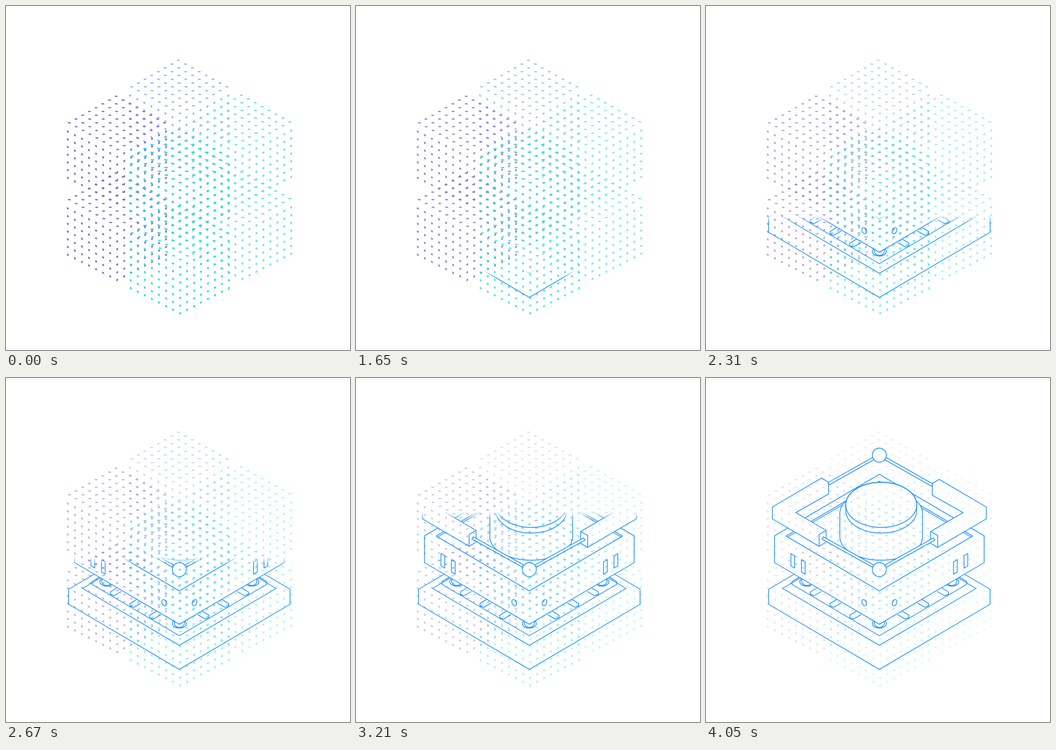
An HTML page with a canvas for the animation above (5850 ms loop, 640 px wide and 640 px high).

```html
<!DOCTYPE html>
<html lang="en">
<head>
<meta charset="utf-8">
<title>Dot cubes to line drawing</title>
<style>
html, body { margin: 0; width: 100%; height: 100%; overflow: hidden; background: #fff; }
canvas { display: block; width: 100vw; height: 100vh; }
</style>
</head>
<body>
<canvas id="stage"></canvas>
<script>
const LOOP = 5850, START = 1350, SPAN = 2700, STEP = 30;
const SIZE = 640, FADE = 14;
const AXIS = 322.5, S = 0.588; // centre line and slope of the isometric edges
const SIDES = [-1, 1];
const BLUE = '#1e90ff';
const DOTS = { back: '#8fb4f8', left: '#7d6cd2', right: '#62dfef', front: '#18e0e2' };
const ratio = Math.max(1, window.devicePixelRatio || 1);

function makeLayer(canvas) {
  canvas.width = canvas.height = SIZE * ratio;
  const layer = canvas.getContext('2d');
  layer.scale(ratio, ratio);
  return layer;
}
const newLayer = () => makeLayer(document.createElement('canvas'));

const ctx = makeLayer(document.getElementById('stage'));
const ink = newLayer();
const veil = newLayer();

// --- Dot cubes ---

function dot(x, y, rx, ry, turn) {
  ctx.beginPath();
  ctx.ellipse(x, y, rx, ry, turn, 0, Math.PI * 2);
  ctx.fill();
}

function drawCube(ax, ay, color) {
  ctx.fillStyle = color;
  for (let i = 0; i < 8; i++) {
    for (let j = 0; j < 8; j++) {
      dot(ax + i * 12.85 - j * 12.45, ay + (i + j) * 7.05, 3, 1.25, 0.03);
    }
  }
  for (let c = -7; c <= 7; c++) {
    for (let r = 0; r < 7; r++) {
      const x = ax + 2 + c * (c < 0 ? 13.15 : 12.95);
      const y = ay + 198.7 - Math.abs(c) * 6.7 - r * 14.35;
      dot(x, y, 2.25, 1.55, c < 0 ? 0.95 : -0.95);
    }
  }
}

// One column of two cubes; a counts right, b counts left
function drawColumn(a, b, color) {
  const x = 321 + 117 * a - 116 * b;
  const y = [101, 167, 230][a + b] + b - a;
  drawCube(x, y + 143, color);
  drawCube(x, y, color);
}

function drawDots() {
  drawColumn(0, 0, DOTS.back);
  drawColumn(0, 1, DOTS.left);
  drawColumn(1, 0, DOTS.right);
  drawColumn(1, 1, DOTS.front);
}

// --- Line drawing, back to front; solids wipe out what they cover ---

function trace(points) {
  ink.beginPath();
  for (const [x, y] of points) ink.lineTo(x, y);
}

function line(points) {
  trace(points);
  ink.stroke();
}

function solid() {
  ink.closePath();
  ink.globalCompositeOperation = 'destination-out';
  ink.fill();
  ink.globalCompositeOperation = 'source-over';
  ink.stroke();
}

function oval(x, y, rx, ry, turn = 0) {
  ink.beginPath();
  ink.ellipse(x, y, rx, ry, turn, 0, Math.PI * 2);
}

// Level square seen as a diamond with half width r
function rim(r, y, round = 0) {
  const back = y - r * S, front = y + r * S;
  ink.beginPath();
  ink.moveTo(AXIS, back);
  ink.arcTo(AXIS + r, y, AXIS, front, round);
  ink.lineTo(AXIS, front);
  ink.arcTo(AXIS - r, y, AXIS, back, round);
  ink.closePath();
  ink.stroke();
}

function slab(r, top, bottom) {
  trace([
    [AXIS - r, top], [AXIS, top - r * S], [AXIS + r, top],
    [AXIS + r, bottom], [AXIS, bottom + r * S], [AXIS - r, bottom]
  ]);
  solid();
}

function tube(x, top, bottom, rx, ry) {
  ink.beginPath();
  ink.ellipse(x, top, rx, ry, 0, Math.PI, 0);
  ink.ellipse(x, bottom, rx, ry, 0, 0, Math.PI);
  solid();
}

function bolt(x, y) {
  oval(x, y, 13, 8.3);
  ink.stroke();
  oval(x, y - 1, 9.5, 8);
  ink.stroke();
}

function drawBase() {
  slab(206, 393, 421);
  rim(180, 391.5);
  rim(167, 381.3, 4);
  bolt(AXIS, 457);
  for (const side of SIDES) {
    bolt(AXIS + side * 135, 379);
    for (let i = 0; i < 3; i++) {
      const u = 128.5 - i * 36.7, y = 398 + i * 21.7;
      const at = (du, dy) => [AXIS + side * (u - du), y + dy];
      line([at(13, -8), at(0, 0), at(0, 4.5), at(7, 7), at(21, -1)]);
    }
  }
}

function drawBox() {
  slab(195, 293.7, 343.5);
  rim(173.5, 294.2);
  line([[AXIS - 170, 295.5], [AXIS, 295.5 - 170 * S], [AXIS + 170, 295.5]]);
  for (const side of SIDES) {
    oval(AXIS + side * 28.2, 418, 4, 6.2, side * 0.42);
    ink.stroke();
    for (const u of [164.5, 145]) {
      const x = AXIS + side * u, y = 326.5 + (164.5 - u) * S;
      const x2 = x - side * 7, y2 = y + 7 * S;
      trace([[x, y], [x2, y2], [x2, y2 + 23], [x, y + 23]]);
      solid();
    }
  }
}

function drawButton() {
  tube(326, 252, 295, 77, 44);
  tube(326, 236, 246.5, 66, 42);
  oval(326, 236, 66, 42);
  ink.stroke();
}

function rod(x1, y1, x2, y2) {
  const len = Math.hypot(x2 - x1, y2 - y1);
  const nx = (y1 - y2) / len * 2.4, ny = (x2 - x1) / len * 2.4;
  trace([[x1 + nx, y1 + ny], [x2 + nx, y2 + ny], [x2 - nx, y2 - ny], [x1 - nx, y1 - ny]]);
  solid();
}

// U-shaped clamp; back and front are the distances of its ends from the axis
function bracket(side, back, front) {
  const outer = 199, inner = 155.5, w = 13, h = 22, mid = 240;
  const at = (u, y) => [AXIS + side * u, y];
  const backY = mid - S * (outer - back);
  const frontY = mid + S * (outer - front - w);
  const tipY = backY + w * S, lipY = frontY - w * S;

  trace([
    at(outer, mid), at(back, backY), at(back - w, tipY), at(back - w, tipY + h),
    at(inner, lipY - S * (inner - front)), at(front, lipY), at(front, lipY + h),
    at(front + w, frontY + h), at(outer, mid + h)
  ]);
  solid();
  line([at(front + w, frontY + h), at(front + w, frontY), at(front, lipY)]);
  rod(...at(back - w, tipY + 3), AXIS, 143.5);
  rod(...at(front + w / 2, lipY + 14), AXIS, 356.5);
}

function drawFrame() {
  bracket(-1, 107.5, 99);
  bracket(1, 111.5, 95.5);
  for (const y of [143.5, 356.5]) {
    oval(AXIS, y, 13, 13);
    solid();
  }
}

function drawModel() {
  ink.strokeStyle = BLUE;
  ink.lineWidth = 1.4;
  ink.lineJoin = 'round';
  drawBase();
  drawBox();
  drawButton();
  drawFrame();
}

// --- Animation ---

// Shows the drawing below a soft edge that climbs at an even speed
function reveal(p) {
  const edge = 538 - 421 * p;
  const mask = veil.createLinearGradient(0, edge, 0, edge + FADE);
  mask.addColorStop(0, 'rgba(0,0,0,0)');
  mask.addColorStop(1, '#000');
  veil.globalCompositeOperation = 'copy';
  veil.drawImage(ink.canvas, 0, 0, SIZE, SIZE);
  veil.globalCompositeOperation = 'destination-in';
  veil.fillStyle = mask;
  veil.fillRect(0, 0, SIZE, SIZE);
  ctx.drawImage(veil.canvas, 0, 0, SIZE, SIZE);
}

function render(time) {
  const t = Math.floor((time % LOOP) / STEP) * STEP;
  const p = Math.min(1, Math.max(0, (t - START) / SPAN));
  ctx.fillStyle = '#fff';
  ctx.fillRect(0, 0, SIZE, SIZE);
  ctx.globalAlpha = 1 - 0.8 * Math.pow(p, 0.7);
  drawDots();
  ctx.globalAlpha = 1;
  if (t >= START) reveal(p);
}

drawModel();
const begin = performance.now();
function tick() {
  render(performance.now() - begin);
  requestAnimationFrame(tick);
}
tick();
</script>
</body>
</html>
```
